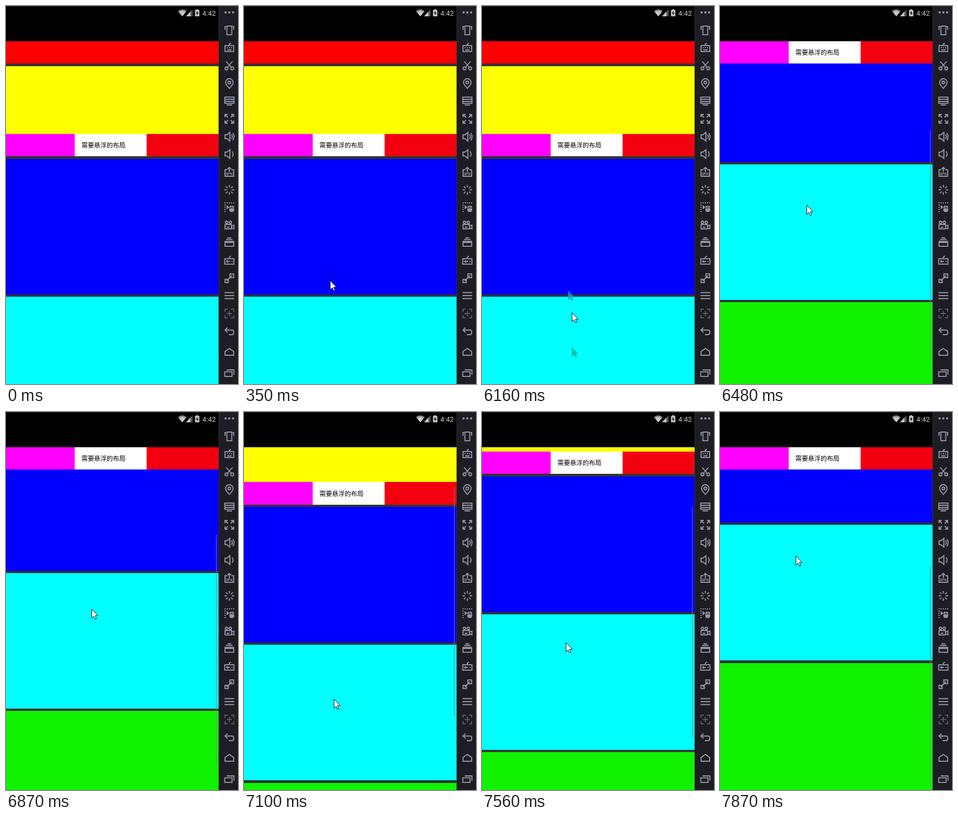
Animation of 429x697 px, one loop 8 s. Source, as an HTML page:

```html
<!DOCTYPE html>
<html lang="zh">
<head>
<meta charset="utf-8">
<title>Sticky layout scroll</title>
<style>
  html, body { margin: 0; width: 100%; height: 100%; overflow: hidden; background: #000; }
  svg { display: block; width: 100vw; height: 100vh; }
  .label { font: 500 11.65px "Noto Sans CJK SC", "Noto Sans CJK", "Noto Sans", sans-serif; }
  .clock { font: 13px Roboto, sans-serif; fill: #c8c8c8; }
  .tiny { font: bold 7px "Liberation Sans", sans-serif; fill: #9496a6; stroke: none; text-anchor: middle; }
  .icons { fill: none; stroke: #9496a6; stroke-width: 1.9; }
  .icons .solid { fill: #9496a6; stroke: none; }
  .crisp { shape-rendering: crispEdges; }
</style>
</head>
<body>
<svg viewBox="0 0 429 697" preserveAspectRatio="none">
  <defs>
    <clipPath id="view"><rect y="65" width="393" height="632"/></clipPath>
    <path id="arrow" d="M.5.5V17L4.3 13.4 6.8 19 9.2 18 6.8 12.4H11.8Z"/>
  </defs>
  <rect width="429" height="697"/>
  <rect width="429" height="1" fill="#2a2a2e"/>
  <g clip-path="url(#view)">
    <rect y="65" width="393" height="632" fill="#333"/>
    <g id="page" class="crisp"></g>
    <g id="bar" class="crisp"></g>
    <rect id="thumb" class="crisp" x="388" width="2" height="424" fill="#808080" opacity=".5"/>
  </g>
  <g fill="#c8c8c8">
    <path d="M318 9.5Q326 3 334 9.5L326 19Z" fill="#8a8a8a"/>
    <path d="M320 11.5Q326 7 332 11.5L326 19Z"/>
    <path d="M345 6V19H333Z" fill="#555"/>
    <path d="M341 10.3V19H333Z"/>
    <path d="M352 6H355V7.3H357.5V19H349.5V7.3H352Z"/>
    <path d="M354.3 8.8L351 13.6H353.2L352.6 17.4 356 12.4H353.8Z" fill="#000"/>
    <text class="clock" x="363" y="17.5">4:42</text>
  </g>
  <rect x="393" width="36" height="697" fill="#1d1d23"/>
  <path d="M393.5 697V.5H429" fill="none" stroke="#303038"/>
  <g id="icons" class="icons"></g>
  <g id="trailA" opacity=".75" fill="#1ca5d2" stroke="#1ca5d2"><use href="#arrow"/></g>
  <g id="trailB" opacity=".85" fill="#14b8a0" stroke="#14b8a0"><use href="#arrow"/></g>
  <use id="cursor" href="#arrow" fill="#fff" stroke="#111"/>
</svg>
<script>
const $ = id => document.getElementById(id);
const LOOP = 8000, BEAT = 77.6, WIDTH = 393;
const TOP = 64.78, UNIT = 41.68, GAP = UNIT / 10;
const rect = (x, y, w, h, fill) =>
  `<rect x="${x}" y="${y}" width="${w}" height="${h}" fill="${fill}"/>`;

// Stack the page; the bar takes one unit right under the yellow block.
let y = TOP, barY = 0, page = '';
for (const [fill, units] of [['#f00', 1], ['#ff0', 3], ['#00f', 6], ['#0ff', 6], ['#10f200', 6]]) {
  page += rect(0, y, WIDTH, units * UNIT, fill);
  y += units * UNIT;
  if (fill === '#ff0') {
    barY = y;
    y += UNIT;
  }
  y += GAP;
}
$('page').innerHTML = page;
$('bar').innerHTML = ['#f0f', '#fff', '#f2000f'].map((fill, i) =>
  rect(i && i * 133 - 6, 0, 133, UNIT, fill)).join('') +
  '<text class="label" x="139.5" y="25.5">需要悬浮的布局</text>';

// Toolbar icon helpers, all drawn around 0,0
const line = d => `<path d="${d}"/>`;
const solid = d => `<path class="solid" d="${d}"/>`;
const box = (x, y, w, h) => `<rect x="${x}" y="${y}" width="${w}" height="${h}"/>`;
const ring = (x, y, r) => `<circle cx="${x}" cy="${y}" r="${r}"/>`;
const mirror = art => art + `<g transform="scale(-1 1)">${art}</g>`;
const spin = (n, art) => Array.from({ length: n }, (_, i) =>
  `<g transform="rotate(${i * 360 / n})">${art}</g>`).join('');
const dots = (n, gap, y, size = 2) => Array.from({ length: n }, (_, i) => {
  const x = (i - (n - 1) / 2) * gap - size / 2;
  return solid(`M${x} ${y}h${size}v${size}h${-size}z`);
}).join('');
const speaker = line('M-8 -3.5H-4.5L1 -8V8L-4.5 3.5H-8Z');
const corner = 'M-8 -3V-8H-3';

const icons = [
  dots(3, 7, -2, 3.6),
  box(-4.5, -8, 9, 16) + mirror(line('M8 -6V-1') + solid('M6 -8h3v2h-3z')),
  box(-8, -4, 16, 11) + line('M0 -4V-7L3 -8M-4 4H4') + dots(3, 4, -1),
  mirror(line('M-6 -8L3.5 3') + ring(5.3, 5, 2.7)),
  line('M0 9C-4 4 -7 2 -7 -2A7 7 0 0 1 7 -2C7 2 4 4 0 9Z') + ring(0, -2, 2.5),
  box(-8.5, -7, 17, 11.5) + line('M-5 7.5H5M-8 -3H8M-8 1H8'),
  spin(4, line(corner + 'M-7 -7L-2.5 -2.5')),
  speaker + line('M4 -4Q7 0 4 4M6.5 -6.5Q11 0 6.5 6.5'),
  speaker + line('M5 -5Q9 0 5 5'),
  line('M-4 -4H-8V8H8V-4H4M0 0V-8M-3.5 -5L0 -8.5 3.5 -5') + '<text class="tiny" y="6">3PK</text>',
  spin(8, line('M0 -9V-4.5')),
  dots(5, 4, -9) + `<g transform="rotate(-90)">${dots(5, 4, -9)}</g>` +
    solid('M-5 -4L0 0 -5 4ZM0 1Q0 -3 4 -3V1ZM5 -3Q9 -3 9 1H5ZM0 2H9V5Q9 9 4.5 9T0 5Z'),
  box(-8, -1, 12, 8) + ring(-5.3, -5, 2.2) + ring(1.7, -5, 2.2) + line('M4 2L8.5 0V7L4 5M-5 4H0'),
  box(-8, -2, 16, 9) + line('M-8 0H8M-6 -5.5H6M-3.5 -8.5H3.5'),
  box(-8.5, -3, 17, 10) + line('M0 -3V-6L3 -8M-6 2H-1M-3.5 -.5V4.5') + dots(1, 0, 1) + solid('M4 1h2v2h-2z'),
  box(1, -8, 7, 7) + box(-8, 2, 6, 6) + line('M-5 5L5 -5'),
  line('M-9 -5.5H9M-9 0H9M-9 5.5H9'),
  `<g opacity=".5">${spin(4, line(corner + 'M0 0V-5'))}</g>`,
  line('M-3.5 -7L-8 -2.5 -3.5 2M-8 -2.5H5Q8 -2.5 8 .5V3Q8 6 5 6H-1'),
  line('M-8 6V-1L0 -6.5 8 -1V6Z'),
  box(-8.5, -2.5, 13.5, 8.5) + line('M-5 -6H8.5V3')
];
$('icons').innerHTML = icons.map((art, i) => {
  const cy = Math.round(12 + 32.65 * i + 6 * Math.max(0, i - 18));
  return `<g transform="translate(413 ${cy})">${art}</g>`;
}).join('');

// Pointer moves: key poses are beat, x, y, scroll
const MOVE = 2550, DRAG = 6160;
const moves = [
  { start: 190, keys: [[0, 301, 637, 0], [2, 159, 506, 0]] },
  { start: MOVE, keys: [[0, 159, 525, 0], [2, 166, 629, 0]] },
  { start: DRAG, keys: [
    [0, 166, 565, 0], [4, 160, 367, 244], [6, 154, 268, 327.4], [7, 153, 252, 327.4],
    [12, 166, 529, 106.5], [14, 168, 610, 8], [15, 168, 615, 0],
    [18, 155, 425, 163], [21, 140, 274, 327.4], [22, 140, 265, 327.4]
  ] }
];

function pose(t) {
  const move = moves.findLast(m => t >= m.start);
  if (!move) return [-50, -50, 0];
  const { start, keys } = move;
  const beat = Math.min(Math.floor((t - start) / BEAT), keys.at(-1)[0]);
  const next = Math.max(1, keys.findIndex(k => k[0] >= beat));
  const a = keys[next - 1], b = keys[next];
  const p = (beat - a[0]) / (b[0] - a[0]);
  return [1, 2, 3].map(i => a[i] + (b[i] - a[i]) * p);
}

const place = (id, x, y) => $(id).setAttribute('transform', `translate(${x} ${y})`);
const show = (id, on) => $(id).setAttribute('visibility', on ? 'visible' : 'hidden');

place('trailA', 159, 525);
place('trailB', 166, 629);

function draw(t) {
  const [x, y, scroll] = pose(t);
  const pressed = t >= DRAG, dragging = t >= DRAG + BEAT;
  place('page', 0, -scroll);
  place('bar', 0, Math.max(TOP, barY - scroll));
  place('thumb', 0, 65 + scroll * 0.673);
  place('cursor', Math.round(x), Math.round(y));
  show('thumb', dragging);
  show('trailA', t >= MOVE + BEAT && !dragging);
  show('trailB', pressed && !dragging);
}

const start = performance.now();
function tick() {
  draw((performance.now() - start) % LOOP);
  requestAnimationFrame(tick);
}
tick();
</script>
</body>
</html>
```
